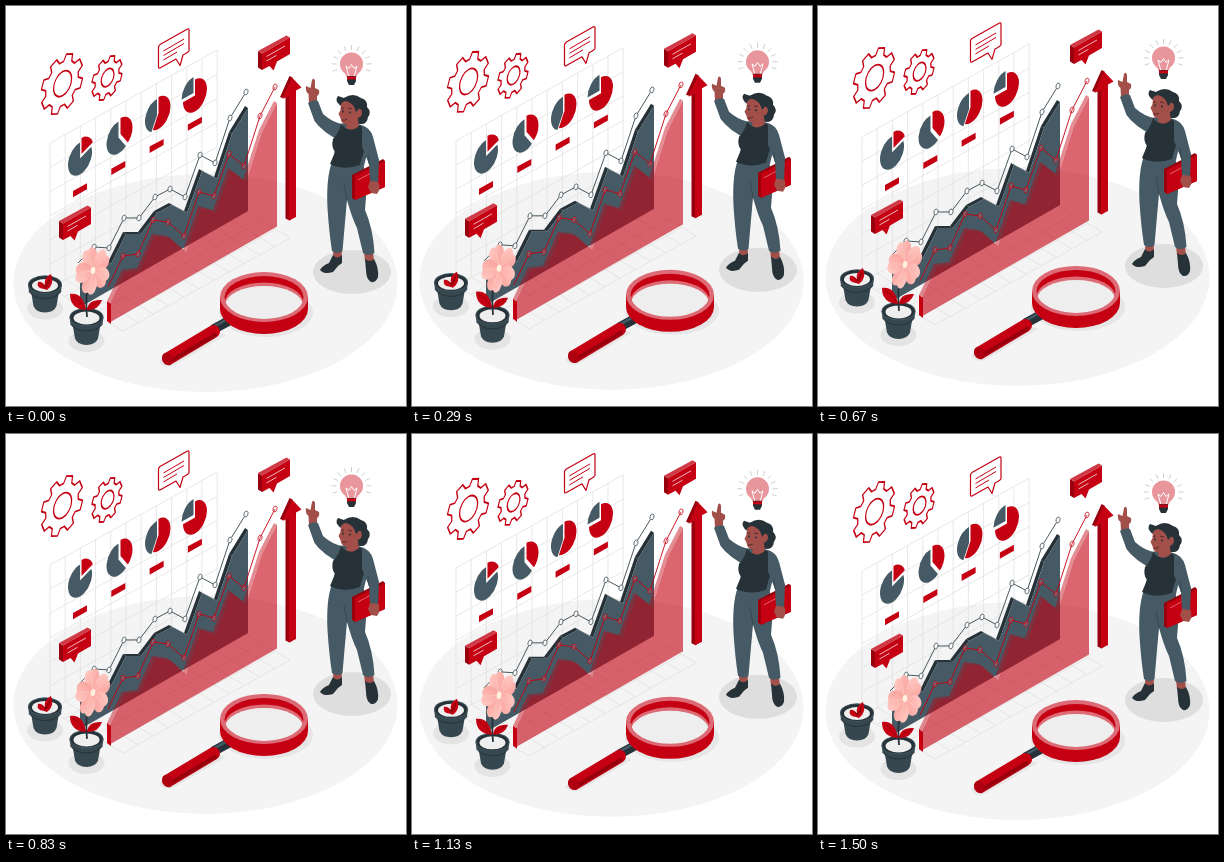
An HTML page with a canvas for the animation above (1540 ms loop, 400x400 px).

```html
<!DOCTYPE html>
<html lang="en">
<head>
<meta charset="utf-8">
<title>Growth analysis</title>
<style>
html, body { margin: 0; width: 100%; height: 100%; overflow: hidden; background: #fff; }
canvas { display: block; width: 400px; height: 400px; }
</style>
</head>
<body>
<canvas id="stage"></canvas>
<script>
const LOOP = 1540, RISE = 6.2, TAU = Math.PI * 2;
const RED = '#c40012', WINE = '#98000e', ROSE = '#dc6b75';
const SLATE = '#455a64', SHADE = '#37474f', DARK = '#263238', SKIN = '#a24f49';
const canvas = document.getElementById('stage');
const ctx = canvas.getContext('2d');
const ratio = window.devicePixelRatio || 1;
canvas.width = canvas.height = 400 * ratio;

function fill(d, color) {
  ctx.fillStyle = color;
  ctx.fill(new Path2D(d));
}
function stroke(d, color, width = 1) {
  ctx.strokeStyle = color;
  ctx.lineWidth = width;
  ctx.stroke(new Path2D(d));
}
function oval(x, y, rx, ry, color, tilt = 0) {
  ctx.beginPath();
  ctx.ellipse(x, y, rx, ry, tilt, 0, TAU);
  ctx.fillStyle = color;
  ctx.fill();
}
function at(x, y, draw) {
  ctx.save();
  ctx.translate(x, y);
  draw();
  ctx.restore();
}
// Coordinates on the plane of the upright wall.
function onWall(x, y, draw) {
  at(x, y, () => {
    ctx.transform(.75, -.42, 0, 1, 0, 0);
    draw();
  });
}
const toPath = points => 'M' + points.map(p => p.join(' ')).join('L');

function grids() {
  let d = '';
  for (let i = 0; i <= 11; i++) {
    const x = 44 + i * 15.2, y = 137 - i * 8.45;
    d += `M${x} ${y}v145l73 43`;
  }
  for (let i = 0; i <= 6; i++) d += `M44 ${137 + i * 24.2}l167.2 -93`;
  for (let i = 1; i <= 5; i++) d += `M${44 + i * 14.6} ${282 + i * 8.6}l167.2 -93`;
  stroke(d, '#dedede', .7);
}

function gear(x, y, r, hole) {
  onWall(x, y, () => {
    const teeth = 8, step = TAU / teeth, points = [];
    for (let i = 0; i < teeth; i++) {
      for (const [part, size] of [[-.34, .78], [-.2, 1], [.2, 1], [.34, .78]]) {
        const a = (i + part) * step - 1.2;
        points.push([r * size * Math.cos(a), r * size * Math.sin(a)]);
      }
    }
    ctx.lineJoin = 'round';
    stroke(toPath(points) + 'Z', RED, 1.7);
    ctx.beginPath();
    ctx.arc(.8, 0, hole, 0, TAU);
    ctx.stroke();
  });
}

function slice(x, y, from, to, color) {
  onWall(x, y, () => {
    ctx.beginPath();
    ctx.moveTo(0, 0);
    ctx.arc(0, 0, 16, from * TAU / 360, to * TAU / 360);
    ctx.fillStyle = color;
    ctx.fill();
  });
}

function pies() {
  slice(74, 152.5, -20, 270, SLATE);
  slice(75.5, 148, -90, -20, RED);
  slice(112.5, 131.5, 52, 270, SLATE);
  slice(114.5, 128, -90, 52, RED);
  slice(151, 109, 118, 270, SLATE);
  slice(152.5, 107, -90, 118, RED);
  slice(189, 89.5, -90, 180, RED);
  slice(187.5, 87, 180, 270, SLATE);
  for (let i = 0; i < 4; i++) {
    at(67 + i * 38.3, 185 - i * 22.2, () => fill('M0 0L14 -7.7v6L0 6.3Z', RED));
  }
}

const slateLine = [[72, 257], [88, 241], [103, 242], [118, 212], [133, 212], [149, 191],
  [164, 183], [179, 191], [194, 149], [209, 157], [224, 112], [240, 86]];
const redLine = [[102, 281], [117, 250], [132, 248], [147, 214], [162, 216], [178, 230],
  [193, 186], [208, 190], [223, 148], [238, 160], [254, 110], [269, 81]];

function area(line, base, front, edge) {
  const top = line.map(([x, y]) => [x + 2, y + 16]);
  const left = top[0][0], right = top[11][0];
  // Only edges that face up and to the left show their thickness.
  top.slice(1).forEach(([x2, y2], i) => {
    const [x1, y1] = top[i];
    if (2 * (x2 - x1) <= 3 * (y2 - y1)) return;
    fill(toPath([[x1, y1], [x1 - 3, y1 - 2], [x2 - 3, y2 - 2], [x2, y2]]) + 'Z', edge);
  });
  fill(toPath([...top, [right, base], [left, base + (right - left) * .573]]) + 'Z', front);
}

function markers(line, color) {
  stroke(toPath(line), color, .9);
  line.slice(1).forEach(([x, y]) => {
    ctx.beginPath();
    ctx.ellipse(x, y, 1.9, 3, .3, 0, TAU);
    ctx.fillStyle = color === RED ? 'rgba(255,255,255,.15)' : '#fff';
    ctx.fill();
    ctx.lineWidth = .8;
    ctx.stroke();
  });
}

function chart() {
  area(slateLine, 205, SLATE, DARK);
  markers(slateLine, SHADE);
  area(redLine, 220.5, 'rgba(196,0,18,.6)', 'rgba(196,0,18,.45)');
  fill('M101 295l4 3v20l-4 -3Z', RED);
  markers(redLine, RED);
}

function outlineBubble() {
  ctx.lineJoin = 'round';
  stroke('M154 38.500L181.500 23q1.500 -.5 1.500 1V44.500q0 1.500 -6 4.500l-3 10.500 -4 -6.500 -16 9q-1.500 .5 -1.500 -1V40.500Z', RED, 1.2);
  stroke('M157.500 45l20.500 -12M157.500 49.500l20.500 -12M157.500 54l13.500 -8', RED, 1);
}

function callout(x, y) {
  at(x, y, () => {
    fill('M0 16L4 18.500V35L0 32.500Z', WINE);
    fill('M0 16L28.500 .5 32 2.500 4 18.500Z', '#cf3a47');
    fill('M4 18.500L32 2.500V19L19 26.500 15.500 35.500 11.500 31 4 35Z', RED);
    stroke('M8.500 21.500L27 11M8.500 26l10 -5.700', '#f1cdd0', .9);
  });
}

function arrow() {
  fill('M274 91L283.500 70l3 1.500v141l-3 2 -4 -2V90l-3 2Z', WINE);
  fill('M276.500 93L286 71.500 295.500 81.500l-5.500 3v126.500l-7 3.500V90Z', RED);
}

function pot(x, y) {
  at(x, y, () => {
    oval(0, 24, 18, 11, '#e4e4e4');
    fill('M-14.500 4L-11.500 21.500Q-9 28 0 28 9 28 11.500 21.500L14.500 4Z', SHADE);
    fill('M-17 0L-16 7Q-11 14 0 14 11 14 16 7L17 0Z', SHADE);
    stroke('M-16 7Q-11 14 0 14 11 14 16 7', DARK, 1);
    oval(0, 0, 17, 9.200, SLATE);
    oval(0, .2, 16, 8.400, DARK);
    oval(0, 1, 13, 6.500, '#eeeeee');
  });
}

function sprout() {
  fill('M38 283Q30 282 32 276 36 275 39 280 37 272 45 268 49 278 41 284Z', RED);
  fill('M33 276q5 2 6 7q5 -5 6 -14q-3 6 -6 10Z', WINE);
}

function flower(turn) {
  stroke('M83 268Q79 292 81 311', DARK, 1.8);
  fill('M80 304Q64 303 64 288 77 286 80 304Z', RED);
  fill('M81 304Q82 293 96 294 93 304 81 304Z', RED);
  stroke('M66 290q9 5 13 13M82 303q6 -6 12 -8', WINE, .8);
  at(87, 264.5, () => {
    ctx.transform(.74, -.16, 0, 1, 0, 0);
    ctx.rotate(turn);
    for (let i = 0; i < 5; i++) {
      ctx.save();
      ctx.rotate(i * TAU / 5 - .3);
      ctx.scale(.9, 1);
      const pink = ctx.createLinearGradient(-10, -18, 10, -4);
      pink.addColorStop(0, '#ffc6c0');
      pink.addColorStop(1, '#f99f99');
      fill('M0 0Q-15 -9 -10 -20Q-6 -26 0 -22Q7 -26 11 -18Q13 -8 0 0Z', pink);
      stroke('M0 -3V-16', '#fbd0ca', .7);
      ctx.restore();
    }
    oval(0, 0, 3.200, 3.500, '#fff0df');
  });
}

function magnifier() {
  oval(260, 307, 47, 24, '#e6e6e6');
  fill('M153 355L211 326l9 3 -53 31q-10 3 -14 -5Z', '#e6e6e6');
  stroke('M207 323.500L229 311.500', DARK, 9.500);
  stroke('M208 320.500L227 310', SLATE, 2.500);
  ctx.lineCap = 'round';
  stroke('M162.500 352.500L207.500 325.500', RED, 13);
  stroke('M163 356L209 329', WINE, 4);
  ctx.lineCap = 'butt';
  oval(161.500, 353, 5, 6.500, '#ae0010', -.5);
  fill('M214 291v12A44 25 0 0 0 302 303V291Z', RED);
  oval(258, 291, 44, 25, ROSE);
  oval(258, 291.500, 39.500, 21.500, RED);
  ctx.save();
  ctx.clip(new Path2D('M218.500 291.500a39.500 21.500 0 0 1 79 0a39.500 21.500 0 0 1 -79 0Z'));
  oval(258, 297, 39.500, 20.500, ROSE);
  oval(258, 299.500, 39, 19.500, '#eeeeee');
  ctx.restore();
}

function bulb() {
  let rays = '';
  for (let i = 0; i < 11; i++) {
    const a = Math.PI * (.9 + i * .12), c = Math.cos(a), s = Math.sin(a);
    rays += `M${345.5 + 15 * c} ${59 + 15 * s}L${345.5 + 20 * c} ${59 + 20 * s}`;
  }
  stroke(rays, '#cfcfcf', 1);
  fill('M334 58a11.500 11.500 0 0 1 23 0q0 6 -5 9.500l-2 4h-9l-2 -4q-5 -3.500 -5 -9.500Z', '#e8959c');
  stroke('M343 71l-3 -11 3 2.500 2.500 -4 2.500 4 3 -2.500 -3 11', '#fff', 1);
  fill('M341 70h9v5l-2 4h-5l-2 -4Z', DARK);
  fill('M341 70.500h9v3h-9Z', RED);
}

function woman() {
  oval(346, 266, 39, 22, '#dedede');
  // Ankles and shoes
  fill('M327 244h9l-.5 9h-8Z', SKIN);
  fill('M358 246h9l1 9h-9Z', SKIN);
  fill('M327 249Q331 254 336 249L336 257 332 260 327 266Q318 269 314 264 316 260 323 257Z', DARK);
  fill('M359 253q5 4 9 0q5 9 4 18q-2 6 -7 5q-5 -3 -5 -12Z', DARK);
  // Trousers
  fill('M326 156Q320 172 321.500 202Q323 226 326 245Q331 249 336.500 245L339 216 341 194Q346 212 351 222L357 247Q362 251 368.500 247Q367 222 359 204L361 178 357 156Z', SLATE);
  stroke('M341 194L338 177', SHADE, .9);
  // Raised arm
  fill('M303 97L302.500 88Q299 85 300 80L304.500 82 306 74Q308 71 309 75L309 82 313 84Q314 88 311 90L311 96Z', SKIN);
  fill('M302 97Q307 93 312 95L317 108Q326 116 336 118L336 136Q316 126 308.500 115Z', SLATE);
  // Torso
  fill('M334 118Q347 115 358 120Q364 124 363 139L358 160Q340 164 326 158L330 140Q326 128 334 118Z', SLATE);
  fill('M335 118Q333 127 327 133Q325 141 329 146L324 158Q338 165 354 159L357 148Q363 139 356 121L353 119Q347 126 339 122Z', DARK);
  // Head: back hair, neck, face and fringe
  fill('M338 92Q347 86 355 92Q362 94 361 101Q366 106 362 111Q361 119 354 118Q349 119 346 112Z', DARK);
  fill('M342 111l9 -4 2 13q-7 6 -13 2Z', SKIN);
  fill('M335 97Q341 92 347 98L350 104Q355 101 356 106Q356 112 350 112Q350 119 343 119Q335 119 334.500 112L332.500 108 334.500 104Z', SKIN);
  fill('M334.500 100Q328 94 332 90L338 92Q349 88 355 97L352 104 350 106Q348 97 340 95Q335 96 334.500 100Z', DARK);
  stroke('M335 102.500l3 -.5M342 102l4 1M336 114q3 1 5 -1', '#4a2428', .9);
  oval(337, 105.500, .8, 1.200, DARK);
  oval(344, 106.500, .8, 1.200, DARK);
  // Folder and lowered arm
  fill('M346 169L377 153l2 2V181L349 194l-3 -2Z', WINE);
  fill('M349 170L379 155V181L349 194Z', RED);
  stroke('M352 174L365 167', '#e77d86', .8);
  fill('M356 120Q364 121 367 131L373 154 372 178 364 176 363 158 356 141Z', SLATE);
  stroke('M363 158l-1 -10', SHADE, .9);
  fill('M364 175l8.500 1Q375 183 371 188L365 187 362 181Z', SKIN);
}

function scene(lift) {
  oval(199.5, 277, 192, 109, '#f4f4f4');
  grids();
  gear(56, 78, 28, 12);
  gear(101, 72, 20.500, 8.500);
  outlineBubble();
  pies();
  chart();
  callout(252, 29);
  callout(53, 199);
  arrow();
  pot(39, 278.5);
  sprout();
  pot(80.500, 311);
  flower(lift * .2);
  magnifier();
  woman();
  bulb();
}

function frame(now) {
  const phase = ((now + 20) % LOOP) / LOOP;
  const lift = (1 - Math.cos(phase * TAU)) / 2;
  ctx.setTransform(ratio, 0, 0, ratio, 0, 0);
  ctx.fillStyle = '#fff';
  ctx.fillRect(0, 0, 400, 400);
  at(0, -RISE * lift, () => scene(lift));
  requestAnimationFrame(frame);
}
requestAnimationFrame(frame);
</script>
</body>
</html>
```
